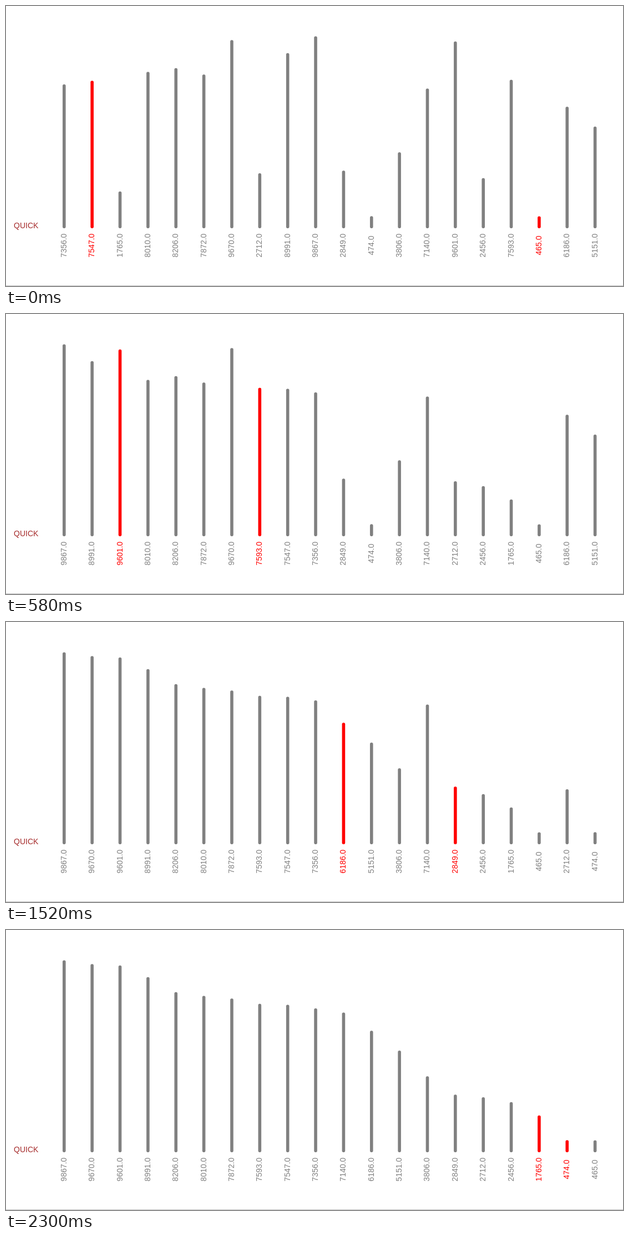
Write an HTML page with a canvas that moves like this. It is 1112 px wide and 504 px high and loops after 3310 ms.

```html
<!DOCTYPE html>
<html lang="en">
<head>
<meta charset="utf-8">
<title>Quicksort</title>
<style>
  html, body { margin: 0; height: 100%; overflow: hidden; background: #fff; }
  canvas { display: block; }
</style>
</head>
<body>
<canvas id="stage" width="1112" height="504"></canvas>
<script>
const canvas = document.getElementById('stage');
const ctx = canvas.getContext('2d');
const LOOP = 3310, BASE = 400, BAR = 5.6;
const GREY = '#808080', RED = '#ff0000', BROWN = '#a52a2a';

const values = [7356, 465, 1765, 8010, 8206, 7872, 9670, 2712, 8991, 9867,
                2849, 474, 3806, 7140, 9601, 2456, 7593, 7547, 6186, 5151];
const states = [];

// A steady clock that skips about every third tick
const swapTime = n => Math.floor(n * 22 / 15 + 0.1) * 77.7 - 41.7;

function swap(a, b) {
  [values[a], values[b]] = [values[b], values[a]];
  states.push({ time: swapTime(states.length), values: values.slice(), active: [a, b] });
}

// Descending quicksort with the first element as pivot
function sort(lo, hi) {
  if (lo >= hi) return;
  const pivot = values[lo];
  let i = lo + 1, j = hi;
  while (true) {
    while (i <= hi && values[i] >= pivot) i++;
    while (values[j] < pivot) j--;
    if (i > j) break;
    swap(i, j);
  }
  swap(lo, j);
  sort(lo, j - 1);
  sort(j + 1, hi);
}

function drawBar(slot, value, color) {
  const x = 104.8 + 50.36 * slot;
  const top = 394.5 - 0.03446 * value;
  ctx.strokeStyle = ctx.fillStyle = color;
  ctx.beginPath();
  ctx.moveTo(x, top + BAR / 2);
  ctx.lineTo(x, BASE - BAR / 2);
  ctx.stroke();

  ctx.save();
  ctx.translate(x + 4, 431);
  ctx.rotate(-Math.PI / 2);
  ctx.textAlign = 'center';
  ctx.fillText(value.toFixed(1), 0, 0);
  ctx.restore();
}

function draw(state) {
  ctx.clearRect(0, 0, canvas.width, canvas.height);
  ctx.fillStyle = '#c0c0c0';
  ctx.fillRect(0, 503, canvas.width, 1);
  ctx.fillStyle = BROWN;
  ctx.fillText('QUICK', 14, BASE);
  state.values.forEach((v, i) => drawBar(i, v, state.active.includes(i) ? RED : GREY));
}

ctx.font = '14px "Liberation Sans", Arial, sans-serif';
ctx.lineWidth = BAR;
ctx.lineCap = 'round';
sort(0, values.length - 1);

const start = performance.now();
function tick() {
  const t = (performance.now() - start) % LOOP;
  draw(states.filter(s => s.time <= t).pop());
  requestAnimationFrame(tick);
}
tick();
</script>
</body>
</html>
```
